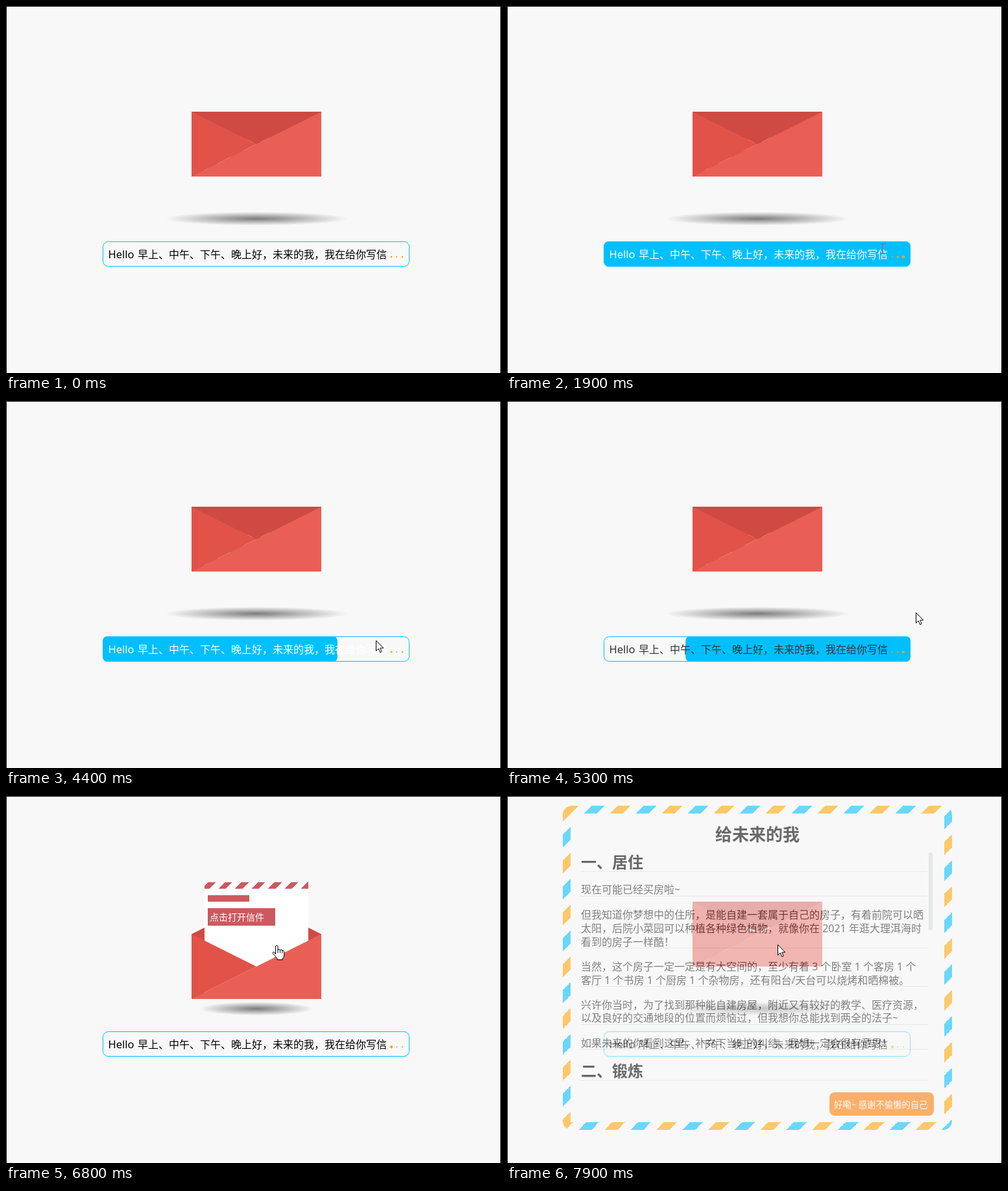
Recreate the animation shown at these times as an HTML page. Size 763x566 px, loop 8000 ms.

```html
<!DOCTYPE html>
<html lang="zh-CN">
<head>
<meta charset="utf-8">
<style>
html, body { margin: 0; height: 100%; overflow: hidden; background: #f8f8f8; }
svg { display: block; }
text { font: 16px "Noto Sans", "Noto Sans CJK SC", "Noto Sans CJK", sans-serif; white-space: pre; }
#cursor path { fill: #fff; stroke: #000; stroke-linejoin: round; }
#cursor #beam { fill: none; stroke: #fff; }
#cursor.beam { mix-blend-mode: difference; }
</style>
</head>
<body>
<svg width="763" height="566" viewBox="0 0 763 566">
  <defs>
    <radialGradient id="shade">
      <stop stop-opacity=".5"/><stop offset="1" stop-opacity="0"/>
    </radialGradient>
    <linearGradient id="redStripes" gradientUnits="userSpaceOnUse" spreadMethod="repeat" x1="160" y1="10" x2="147.27" y2="-2.73">
      <stop stop-color="#cb5a5e"/><stop offset=".444" stop-color="#cb5a5e"/>
      <stop offset=".444" stop-color="#fff"/><stop offset="1" stop-color="#fff"/>
    </linearGradient>
    <linearGradient id="airmail" gradientUnits="userSpaceOnUse" spreadMethod="repeat" x1="178" y1="27" x2="138" y2="-13">
      <stop stop-color="orange"/><stop offset=".25" stop-color="orange"/>
      <stop offset=".25" stop-color="#f8f8f8"/><stop offset=".5" stop-color="#f8f8f8"/>
      <stop offset=".5" stop-color="#00bfff"/><stop offset=".75" stop-color="#00bfff"/>
      <stop offset=".75" stop-color="#f8f8f8"/><stop offset="1" stop-color="#f8f8f8"/>
    </linearGradient>
    <clipPath id="letterClip"><rect id="letterBox" width="160" height="60"/></clipPath>
  </defs>

  <rect width="763" height="566" fill="#f8f8f8"/>
  <ellipse id="shadow" cx="386" cy="328" rx="141" ry="10.6" fill="url(#shade)"/>

  <g id="mail">
    <rect x="286" y="163" width="200" height="100" fill="#cf4a43"/>
    <path id="flapBack" d="M-100 0H100L0 50Z" fill="#cf4a43"/>
    <g id="letter" clip-path="url(#letterClip)">
      <rect width="160" height="180" fill="#fff"/>
      <rect width="160" height="10" fill="url(#redStripes)"/>
      <path d="M5 20h64v10h-64zM5 40h104v27h-104z" fill="#cb5a5e"/>
      <text x="8" y="59" fill="#fff" style="font-size:14px">点击打开信件</text>
    </g>
    <path d="M286 263H486V163Z" fill="#e95f55"/>
    <path d="M286 163L386 213L286 263Z" fill="#e15349"/>
    <path id="flapFront" d="M-100 0H100L0 50Z" fill="#cf4a43"/>
  </g>

  <rect id="fill" y="363" height="39" ry="8" fill="#00bfff"/>
  <rect x="149.5" y="363.5" width="472" height="38" rx="8" fill="none" stroke="#00bfff"/>
  <g id="label">
    <text x="157.5" y="389" style="font-size:16.5px">Hello</text>
    <text x="203" y="389">早上、中午、下午、晚上好，未来的我，我在给你写信</text>
  </g>
  <g id="dots" fill="orange">
    <circle cx="594" cy="387"/><circle cx="602.3" cy="387"/><circle cx="611" cy="387"/>
  </g>

  <g id="page">
    <rect x="86" y="15" width="600" height="500" rx="14" fill="url(#airmail)"/>
    <rect x="98" y="27" width="576" height="476" fill="#f8f8f8"/>
    <path d="M114 116.5H648M114 154.5H648M114 234.5H648M114 293.5H648M114 352.5H648M114 390.5H648M114 438.5H648" stroke="#ddd"/>
    <rect x="650" y="87" width="6" height="120" rx="3" fill="#d6dbdd"/>
    <rect x="497" y="457" width="161" height="36" rx="8" fill="#ff7a00"/>
    <text x="504" y="481" fill="#fff" style="font-size:13.33px">好嘞~ 感谢不偷懒的自己</text>
  </g>

  <g id="cursor">
    <path id="arrow" d="M.5.5V16.5L4.2 13L6.8 18.8L9.2 17.7L6.7 12H11.8Z"/>
    <path id="beam" d="M-4-7.5H4M0-7.5V7.5M-4 7.5H4"/>
    <path id="hand" d="M-1.5 14V2Q-1.5 .5 .3 .5T2 2V8Q2 6.5 3.7 6.5T5.5 8.3Q5.7 7 7 7T8.7 9Q9 8 10 8.2T11.7 10.5V16Q11.5 19 9.5 20V22.5H1V20.5Q-3 16-5.5 13Q-6.5 11-5 10.5T-1.5 14M2 8V12M5.5 8.5V12M8.7 9.2V12.5"/>
  </g>
  <path d="M.5 566V.5H762.5V566" fill="none" stroke="#000"/>
</svg>
<script>
const $ = id => document.getElementById(id);
const set = (el, attrs) => { for (const k in attrs) el.setAttribute(k, attrs[k]); };
const LOOP = 8000, STEP = 100;

// Letter text: baseline, text
const lines = [
  [150, '现在可能已经买房啦~'],
  [189, '但我知道你梦想中的住所，是能自建一套属于自己的房子，有着前院可以晒'],
  [210, '太阳，后院小菜园可以种植各种绿色植物，就像你在 2021 年逛大理洱海时'],
  [231, '看到的房子一样酷！'],
  [269, '当然，这个房子一定一定是有大空间的，至少有着 3 个卧室 1 个客房 1 个'],
  [290, '客厅 1 个书房 1 个厨房 1 个杂物房，还有阳台/天台可以烧烤和晒棉被。'],
  [328, '兴许你当时，为了找到那种能自建房屋，附近又有较好的教学、医疗资源，'],
  [348, '以及良好的交通地段的位置而烦恼过，但我想你总能找到两全的法子~'],
  [387, '如果未来的你看到这里，补充下当时的纠结，我想一定会很有意思！']
];
function write(x, y, text, style) {
  const el = document.createElementNS('http://www.w3.org/2000/svg', 'text');
  set(el, { x, y, style });
  el.textContent = text;
  $('page').append(el);
}
lines.forEach(([y, text]) => write(114, y, text, 'fill:#2a2a2a'));
write(321, 69, '给未来的我', 'font-size:26px;font-weight:700');
write(114, 111, '一、居住', 'font-size:24px;font-weight:700');
write(114, 433, '二、锻炼', 'font-size:24px;font-weight:700');

// CSS "ease" curve, solved by bisection
function ease(x) {
  if (x <= 0) return 0;
  if (x >= 1) return 1;
  let lo = 0, hi = 1, s;
  for (let i = 0; i < 20; i++) {
    s = (lo + hi) / 2;
    const at = .75 * s * (1 - s) ** 2 + .75 * s * s * (1 - s) + s ** 3;
    if (at < x) lo = s; else hi = s;
  }
  return .3 * s * (1 - s) ** 2 + 3 * s * s * (1 - s) + s ** 3;
}

const hovers = [[800, 2480], [4028, 5150]];
const OPEN = 6000, CLICK = 7268;

// Pointer path: time, x, y
const path = [
  [100, 659, 86], [400, 655, 210], [800, 600, 363], [1000, 580, 374], [1900, 579, 374],
  [2480, 622, 381], [2700, 667, 383], [2900, 672, 380], [3200, 681, 350], [3400, 655, 320],
  [3600, 601, 349], [4028, 583, 364], [4400, 570, 369], [4700, 572, 369], [5150, 613, 361],
  [5400, 641, 303], [5800, 560, 285], [5990, 486, 258], [6100, 417, 230], [8000, 417, 229]
];
function pointer(t) {
  const i = Math.max(1, path.findIndex(p => p[0] >= t));
  const [t0, x0, y0] = path[i - 1], [t1, x1, y1] = path[i];
  const k = (t - t0) / (t1 - t0);
  return [Math.round(x0 + (x1 - x0) * k), Math.round(y0 + (y1 - y0) * k)];
}

function drawEnvelope(t) {
  const go = (openDelay, closeDelay) =>
    ease((t - OPEN - openDelay) / 400) - ease((t - CLICK - closeDelay) / 400);
  const drop = go(0, 0), rise = go(200, 200), turn = Math.cos(Math.PI * go(0, 400));
  const height = 60 + 120 * rise;
  set($('mail'), { transform: `translate(0 ${50 * drop})` });
  set($('shadow'), { rx: (400 - 150 * drop) * Math.SQRT1_2 / 2 });
  set($('letter'), { transform: `translate(306 ${263 - height})` });
  set($('letterBox'), { height });
  for (const id of ['flapBack', 'flapFront'])
    set($(id), {
      transform: `translate(386 163) scale(1 ${turn})`,
      visibility: (id === 'flapFront') === (turn > 0) ? 'visible' : 'hidden'
    });
}

function drawButton(t) {
  const [start, end] = hovers[t < hovers[1][0] ? 0 : 1];
  const leaving = t >= end;
  const amount = leaving ? 1 - ease((t - end) / 800) : ease((t - start) / 800);
  const width = 473 * amount;
  set($('fill'), { x: leaving ? 622 - width : 149, width, rx: 8 * amount });
  const tone = 255 * (ease((t - start) / 300) - ease((t - end) / 300));
  set($('label'), { fill: `rgb(${tone},${tone},${tone})` });

  const phase = t / 1100 % 1;
  [...$('dots').children].forEach((dot, i) => {
    const d = Math.abs(phase - [.25, .52, .72][i]);
    const gap = Math.min(d, 1 - d);
    set(dot, { r: 1.1 + 1.1 * (gap < .32 ? Math.cos(gap / .32 * Math.PI / 2) : 0) });
  });
}

function drawCursor(t) {
  const [x, y] = pointer(t);
  const kind = t >= OPEN && t < CLICK ? 'hand' : y > 372 && x < 588 ? 'beam' : 'arrow';
  set($('cursor'), { transform: `translate(${x} ${y})`, class: kind, display: t < 100 ? 'none' : 'inline' });
  for (const id of ['arrow', 'beam', 'hand']) set($(id), { display: id === kind ? 'inline' : 'none' });
}

const began = performance.now();
function frame() {
  const t = Math.floor((performance.now() - began) % LOOP / STEP) * STEP;
  drawEnvelope(t);
  drawButton(t);
  set($('page'), { opacity: ease((t - 7320) / 1750) });
  drawCursor(t);
  requestAnimationFrame(frame);
}
frame();
</script>
</body>
</html>
```
